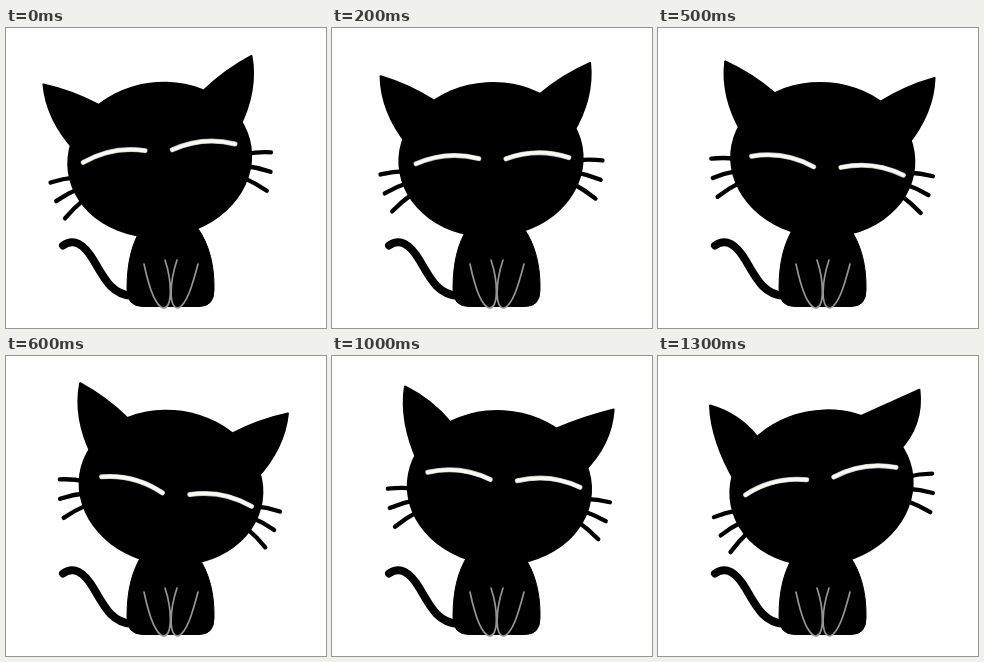
Animation, 320 px wide and 300 px high, one loop 1.4 s. Source, as an HTML page with a canvas:

```html
<!DOCTYPE html>
<html lang="en">
<head>
<meta charset="utf-8">
<title>Cat swaying its head</title>
<style>
html, body { margin: 0; width: 100%; height: 100%; overflow: hidden; background: #fff; }
canvas { display: block; }
</style>
</head>
<body>
<canvas id="stage" width="320" height="300"></canvas>
<script>
const ctx = document.getElementById('stage').getContext('2d');
const STEP = 100, STEPS = 14, HEAD_Y = 131.7;

// Head sway: step, tilt in degrees, centre x
const SWAY = [
  [0, -7.8, 153.7], [1, -10.3, 153.6], [2, -3.6, 159], [4, 0.8, 164.5],
  [6, 8.3, 165], [8, 12.5, 163.7], [10, 3.5, 167.4], [12, -0.6, 168], [13, -11.3, 163.5]
];

const rad = degrees => degrees * Math.PI / 180;
const mix = (a, b, f) => a + (b - a) * f;
const polar = (radius, degrees) => [radius * Math.cos(rad(degrees)), radius * Math.sin(rad(degrees))];

function sway(step) {
  const next = SWAY.findIndex(key => key[0] >= step);
  const b = SWAY[next], a = SWAY[Math.max(0, next - 1)];
  const f = a === b ? 0 : (step - a[0]) / (b[0] - a[0]);
  return { tilt: mix(a[1], b[1], f), x: mix(a[2], b[2], f) };
}

function stroke(path, color, width) {
  ctx.strokeStyle = color;
  ctx.lineWidth = width;
  ctx.stroke(path);
}

function solid(path, edge) {
  ctx.fill(path);
  stroke(path, '#000', edge);
}

function turned(x, y, degrees, paint) {
  ctx.save();
  ctx.translate(x, y);
  ctx.rotate(rad(degrees));
  paint();
  ctx.restore();
}

const body = new Path2D('M136 199C126 215 121 234 121 261Q121 278.5 137 278.5H193Q208 278.5 208 262C208.5 239 204 217 191 199Z');
const tail = new Path2D('M57 217.5C68 210 78 216 88 233C99 252 106 266 126 268');
const paws = new Path2D('M138 236C142 255 148 277 157 280C167 280 166 253 159 232M192 236C187 255 181 277 172 280C162 280 164 253 171 232');

function drawBody() {
  solid(body, 1);
  stroke(tail, '#000', 8);
  ctx.fill(paws);
  stroke(paws, '#959595', 1.7);
}

function drawWhiskers() {
  const hairs = new Path2D();
  for (const side of [-1, 1]) {
    for (let i = 0; i < 3; i++) {
      const [x1, y1] = polar(86, 4 + 8 * i), [x2, y2] = polar(111.5, 4 + 10 * i);
      hairs.moveTo(side * x1, y1);
      hairs.quadraticCurveTo(side * (x1 + x2) / 2, (y1 + y2) / 2 - 1.5, side * x2, y2);
    }
  }
  stroke(hairs, '#000', 4.3);
}

// The tip trails behind the base by the given angle.
function drawEar(side, lag) {
  const c = Math.cos(rad(lag)), s = Math.sin(rad(lag));
  const trail = (x, y) => [side * x * c - y * s, side * x * s + y * c];
  const ear = new Path2D();
  ear.moveTo(side * 53, -62.5);
  ear.quadraticCurveTo(...trail(77, -80), ...trail(105, -90.3));
  ear.quadraticCurveTo(...trail(106.5, -55), side * 83, -21);
  ear.closePath();
  solid(ear, 2);
}

function drawEye(x, y, slant) {
  turned(x, y, slant, () => {
    const lid = new Path2D('M-31.5 0Q0 -11 31.5 0');
    stroke(lid, '#b5b5ae', 5);
    stroke(lid, '#f8f8f2', 3.8);
  });
}

function drawFace(step) {
  const wave = -Math.cos(2 * Math.PI * step / STEPS);
  const dip = Math.max(0, Math.sin(Math.PI * (step - 0.5) / 8));
  const x = 3.3 + 3 * wave, y = 14.6 * dip - 8;
  drawEye(x - 45, y - 1.3, 2 + 5 * wave);
  drawEye(x + 45, y + 1.3, 2.5);
}

function drawHead(step) {
  const { tilt, x } = sway(step);
  const lag = 1.4 * Math.max(0, step - 8);
  turned(x, HEAD_Y, tilt, () => {
    drawWhiskers();
    ctx.beginPath();
    ctx.ellipse(0, 0, 92.7, 77.7, 0, 0, Math.PI * 2);
    ctx.fill();
    drawEar(-1, lag);
    drawEar(1, lag);
    drawFace(step);
  });
}

function draw(step) {
  ctx.fillStyle = '#fff';
  ctx.fillRect(0, 0, 320, 300);
  ctx.fillStyle = '#000';
  ctx.lineCap = ctx.lineJoin = 'round';
  drawBody();
  drawHead(step);
}

const start = performance.now();
function tick() {
  draw(Math.floor((performance.now() - start) / STEP) % STEPS);
  requestAnimationFrame(tick);
}
tick();
</script>
</body>
</html>
```
